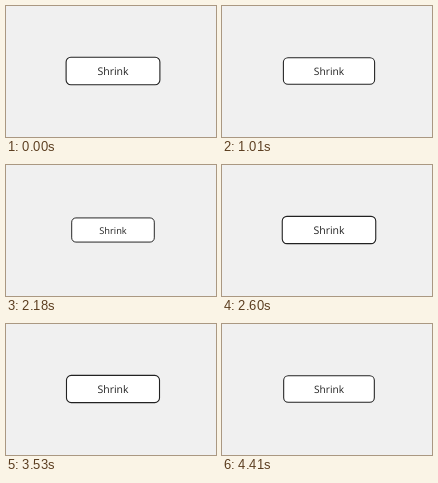
Recreate the animation shown at these times as an HTML page. Size 210 by 131 pixels, loop 4.51 s.

```html
<!DOCTYPE html>
<html lang="en">
<head>
<meta charset="utf-8">
<title>Shrink button</title>
<style>
html, body { margin: 0; width: 100%; height: 100%; overflow: hidden; background: #f0f0f0; }
svg { display: block; width: 100%; height: 100%; }
rect { fill: #fff; stroke: #222; stroke-width: 1.05; }
text { font: 10px "Open Sans", "Noto Sans", sans-serif; fill: #222; text-anchor: middle; text-rendering: geometricPrecision; }
</style>
</head>
<body>
<svg viewBox="0 0 210 131">
  <g id="button">
    <rect x="-44.5" y="-13" width="89" height="26" rx="4.5"/>
    <text y="4.2">Shrink</text>
  </g>
</svg>
<script>
const LOOP = 4510, PERIOD = 942, OFFSET = 108;
const button = document.getElementById("button");
const start = performance.now();

// The pulse pauses twice just before the loop restarts.
const hold = t => t >= 4410 ? 4410 : Math.min(t, 4280);

function draw() {
  const t = hold((performance.now() - start) % LOOP);
  const phase = (t + OFFSET) % PERIOD / PERIOD;
  const shrink = 1 - Math.abs(2 * phase - 1);
  button.setAttribute("transform", `translate(107 65) scale(${1.1 - 0.2 * shrink})`);
  requestAnimationFrame(draw);
}
draw();
</script>
</body>
</html>
```
